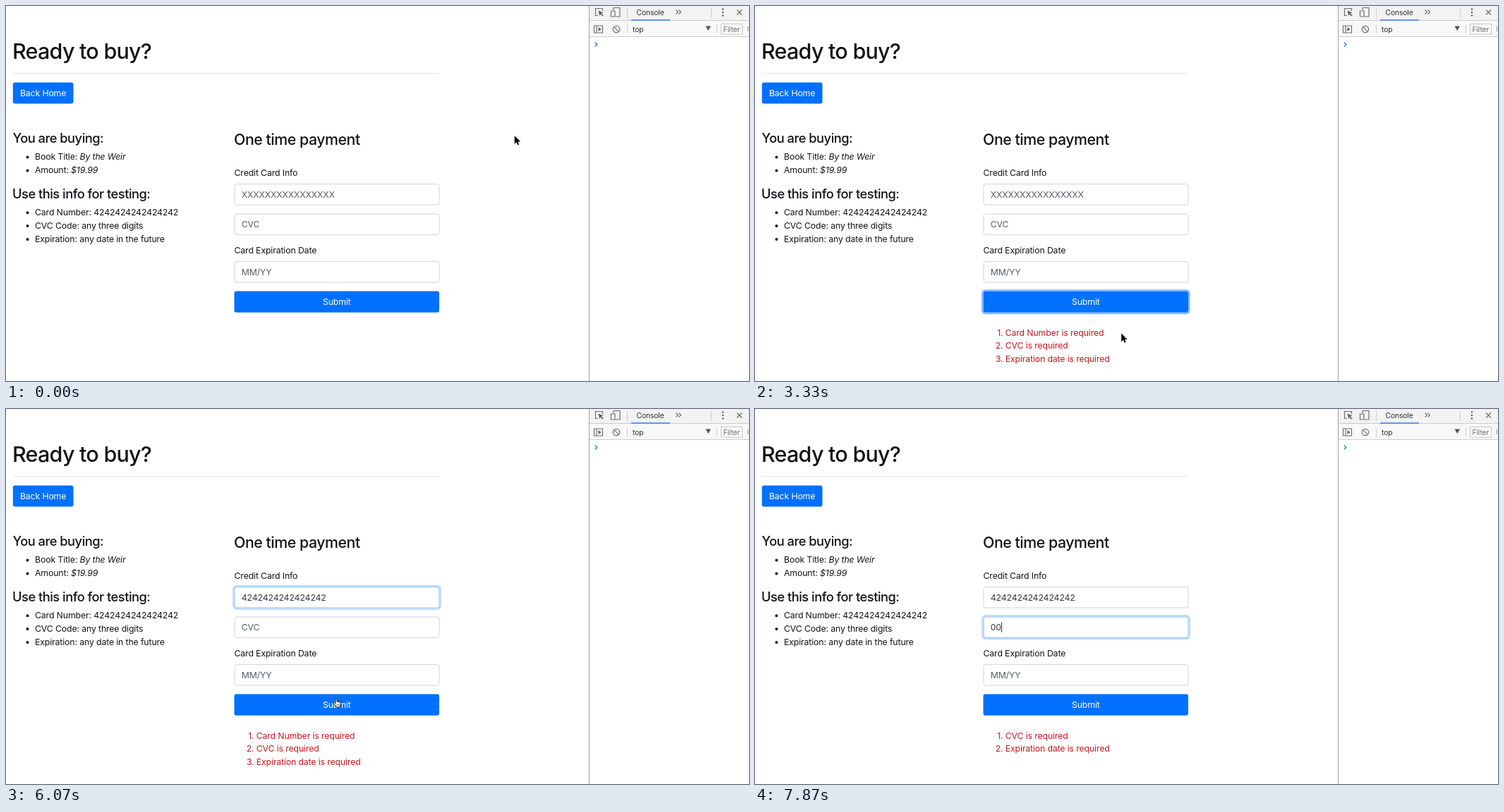
Recreate the animation shown at these times as an HTML page. Size 1053 by 532 pixels, loop 8 s.

```html
<!DOCTYPE html>
<html lang="en">
<head>
<meta charset="utf-8">
<title>Checkout form</title>
<style>
html, body { margin: 0; width: 100%; height: 100%; overflow: hidden; background: #fff; }
svg { display: block; }
text {
  font: 440 12.3px Inter, "Open Sans", sans-serif;
  font-optical-sizing: none;
  letter-spacing: -.011em;
  fill: #111417;
  white-space: pre;
}
.h text { font-weight: 530; letter-spacing: -.025em; }
.h .h1 { font-size: 30.5px; }
.h .h3 { font-size: 21.3px; letter-spacing: -.021em; }
.h .h4 { font-size: 18.3px; letter-spacing: -.027em; }
.btn text { fill: #fff; }
.btn rect { fill: #0070ff; }
.btn .dark { fill: #005cd5; }
.btn .ring, .ring { fill: none; stroke: #80b7ff; stroke-width: 2.5; }
.field { fill: #fff; stroke: #ced4da; }
.focus .field { stroke: #80bdff; }
.focus .ring { stroke: #bfdeff; }
.value { fill: #33393f; }
.value.empty { fill: #555d65; }
#errors text { fill: #c9181f; }
.tools text { font-size: 10.3px; fill: #303030; }
.icon { fill: none; stroke: #6e6e6e; stroke-width: 1.2; }
</style>
</head>
<body>
<svg width="1053" height="532" viewBox="0 0 1053 532">
  <g class="h">
    <text class="h1" x="9" y="75.3">Ready to buy?</text>
    <text class="h4" x="9.5" y="194">You are buying:</text>
    <text class="h4" x="9" y="272.7">Use this info for testing:</text>
    <text class="h3" x="323" y="197">One time payment</text>
  </g>
  <path d="M10 95.5H614" stroke="#e5e5e5"/>
  <g class="btn">
    <rect x="9.8" y="108.4" width="85.7" height="30" rx="3"/>
    <text x="52.6" y="128.3" text-anchor="middle">Back Home</text>
  </g>
  <rect id="selection" x="124.3" y="285.3" width="120.4" height="14.7" fill="#b3d7fe"/>
  <g id="facts"></g>
  <text x="323.5" y="241.3">Credit Card Info</text>
  <text x="323.5" y="351.3">Card Expiration Date</text>
  <g id="fields"></g>
  <g class="btn">
    <rect x="323.5" y="404.6" width="290.5" height="30.1" rx="3"/>
    <rect class="dark" id="dark" x="323.5" y="404.6" width="290.5" height="30.1" rx="3"/>
    <rect class="ring" id="ring" x="322.3" y="403.4" width="292.9" height="32.6" rx="4.2"/>
    <text x="468.8" y="424.3" text-anchor="middle">Submit</text>
  </g>
  <g id="errors"></g>
  <path id="caret" stroke="#333" d="M0 0v14"/>

  <g class="tools">
    <path fill="#f3f3f3" d="M827 0h226v20.5h-226z"/>
    <path fill="#f8f8f8" d="M827 20.5h226v23h-226z"/>
    <path fill="none" stroke="#ccc" d="M827 20.5h226M827 43.5h226M880.5 3v14M999.5 3v14M880.5 27v12M1007.5 27v12"/>
    <path stroke="#a0a0a0" d="M826.5 0v532"/>
    <path stroke="#3b7de9" stroke-width="1.6" d="M886 20h55"/>
    <path class="icon" d="M839 13.5h-3.5v-10h10v3.5M861 6v-3.5h9v12.5h-6M857.5 7h5.5v8h-5.5zM833.5 28h12v10h-12zM837 28v10"/>
    <path fill="#5e5e5e" d="M839.5 6.5l7 3-2.8 1 3 3.2-1.2 1.1-3-3.2-1.2 2.6zM839.5 30.2v5.6l4.3-2.8z"/>
    <g class="icon"><circle cx="865" cy="33" r="4.7"/><path d="M861.7 29.7l6.6 6.6"/></g>
    <text x="893.5" y="12.6">Console</text>
    <path class="icon" d="M949.5 5.5l3 3-3 3M953.5 5.5l3 3-3 3"/>
    <g fill="#5e5e5e"><circle cx="1016" cy="4.5" r="1.2"/><circle cx="1016" cy="9" r="1.2"/><circle cx="1016" cy="13.5" r="1.2"/></g>
    <path class="icon" d="M1036 5.5l7 7M1043 5.5l-7 7"/>
    <text x="888" y="36.5">top</text>
    <path fill="#555" d="M991.5 28.5h7.5l-3.75 6.5z"/>
    <path fill="#fff" stroke="#c4c4c4" d="M1013.5 25.5h30v14.5h-30z"/>
    <path stroke="#999" d="M1051.5 29v7"/>
    <text x="1016.5" y="37" style="fill:#666">Filter</text>
    <path fill="none" stroke="#3b7de9" stroke-width="1.5" d="M834.8 51.5l3 3-3 3"/>
  </g>

  <g id="pointer">
    <path id="arrow" d="M.2.4v11.8l2.7-2.5 1.8 4.1 2-.8-1.8-4.1h3.8z" stroke="#fff" stroke-width=".9" paint-order="stroke"/>
    <g id="hand" fill="#fff" stroke="#111" stroke-width=".95" stroke-linejoin="round">
      <path d="M-1 .3Q0-1 1 .3V4L5.2 4.9Q6.6 5.3 6.4 6.8L5.6 9.6V12H-.4V10.4L-3.6 6.6Q-4 5-2.4 5.4L-1 6.8Z"/>
      <path d="M1.3 7.4v2.6M3.5 7.4v2.6" stroke-width=".7"/>
    </g>
    <path id="beam" fill="none" stroke="#222" d="M-3-6Q0-6 0-4.8V4.8Q0 6-3 6M3-6Q0-6 0-4.8M0 4.8Q0 6 3 6M-1.5 2h3"/>
  </g>
</svg>
<script>
const $ = id => document.getElementById(id);
const CARD = '4242424242424242';
const LOOP = 8000, STEP = 200 / 3;

const facts = [
  [214, 'Book Title: <tspan font-style="italic">By the Weir</tspan>'],
  [233, 'Amount: <tspan font-style="italic">$19.99</tspan>'],
  [292.6, 'Card Number: ' + CARD],
  [311.5, 'CVC Code: any three digits'],
  [330.4, 'Expiration: any date in the future'],
];
$('facts').innerHTML = facts.map(([y, s]) =>
  `<circle cx="30.5" cy="${y + .6}" r="2" fill="#111417"/><text x="41" y="${y + 4.4}">${s}</text>`).join('');

const fieldTops = [252.6, 295, 362.6];
$('fields').innerHTML = fieldTops.map(y => {
  const box = `<rect class="field" x="324" y="${y}" width="290" height="29.4" rx="3"/>`;
  return `${box}<g class="focus">${box}<rect class="ring" x="322.3" y="${y - 1.7}" width="293.4" height="32.8" rx="4.5"/></g>
    <text class="value" x="333.7" y="${y + 19.4}"></text>`;
}).join('');
const focusRings = document.querySelectorAll('.focus');
const values = document.querySelectorAll('.value');

// Pointer hotspot: time, x, y
const path = [
  [0, 720.5, 183.5], [333, 720.5, 183.5], [1133, 566, 421.5], [1800, 566, 421.5],
  [2067, 560, 503], [2267, 562, 499], [3267, 562, 499], [3333, 519, 464],
  [3533, 222.5, 294.5], [3600, 222.5, 294.5], [3733, 214.5, 292.5], [4333, 214.5, 292.5],
  [4400, 256, 289], [4933, 470, 267], [5467, 470, 267], [6067, 468, 411],
  [6267, 468, 416], [6867, 468, 416], [7200, 608, 297], [LOOP, 608, 297],
];

const clamp = v => Math.max(0, Math.min(1, v));
const fade = (t, on, off = Infinity) => clamp((t - on) / 150) - clamp((t - off) / 150);
const within = (t, a, b) => t >= a && t < b;
const show = (el, on) => el.setAttribute('visibility', on ? 'visible' : 'hidden');

function pointerAt(t) {
  const i = Math.max(1, path.findIndex(k => k[0] >= t));
  const [t0, x0, y0] = path[i - 1], [t1, x1, y1] = path[i];
  const p = clamp((t - t0) / (t1 - t0)), e = p * p * (3 - 2 * p);
  return [x0 + (x1 - x0) * e, y0 + (y1 - y0) * e];
}

function cursorKind(x, y) {
  const inForm = x > 323 && x < 615;
  if (inForm && y > 404 && y < 435) return 'hand';
  if (inForm && fieldTops.some(top => y > top && y < top + 30)) return 'beam';
  return x > 40 && x < 300 && y > 283 && y < 340 ? 'beam' : 'arrow';
}

function setValue(i, value, placeholder) {
  values[i].textContent = value || placeholder;
  values[i].classList.toggle('empty', !value);
}

function setCaret(t, card, cvc) {
  const first = within(t, 4800, 5770) || within(t, 6260, 6400);
  const second = t >= 7200;
  show($('caret'), first || second);
  const i = second ? 1 : 0, typed = second ? cvc : card;
  const x = 334.3 + (typed ? values[i].getComputedTextLength() : 0);
  $('caret').setAttribute('transform', `translate(${x} ${fieldTops[i] + 7.7})`);
}

function setErrors(t) {
  const all = ['Card Number', 'CVC', 'Expiration date'];
  const list = t < 1200 ? [] : t < 6600 ? all : all.slice(1);
  $('errors').innerHTML = list.map((name, i) => {
    const y = 467.5 + 18.85 * i;
    return `<text x="351.5" y="${y}" text-anchor="end">${i + 1}.</text><text x="354.7" y="${y}">${name} is required</text>`;
  }).join('');
}

function draw(now) {
  // The picture advances fifteen times a second.
  const t = Math.floor((now % LOOP + 4) / STEP) * STEP + .5;
  const [x, y] = pointerAt(t - .5), kind = cursorKind(x, y);
  $('pointer').setAttribute('transform', `translate(${x} ${y})`);
  for (const id of ['arrow', 'hand', 'beam']) show($(id), id === kind && t < 7660);

  $('dark').setAttribute('opacity', fade(t, 1000, 1866) + fade(t, 6066, 6933));
  $('ring').setAttribute('opacity', fade(t, 1180, 3850) + fade(t, 6380, 7120));
  focusRings[0].setAttribute('opacity', fade(t, 4800, 6380));
  focusRings[1].setAttribute('opacity', fade(t, 7120));
  focusRings[2].setAttribute('opacity', 0);
  show($('selection'), within(t, 4000, 4800));

  const card = t >= 5260 ? CARD : '';
  const cvc = t >= 7860 ? '00' : t >= 7600 ? '0' : '';
  setValue(0, card, 'X'.repeat(16));
  setValue(1, cvc, 'CVC');
  setValue(2, '', 'MM/YY');
  setCaret(t, card, cvc);
  setErrors(t);
}

const start = performance.now();
function tick() {
  draw(performance.now() - start);
  requestAnimationFrame(tick);
}
tick();
</script>
</body>
</html>
```
